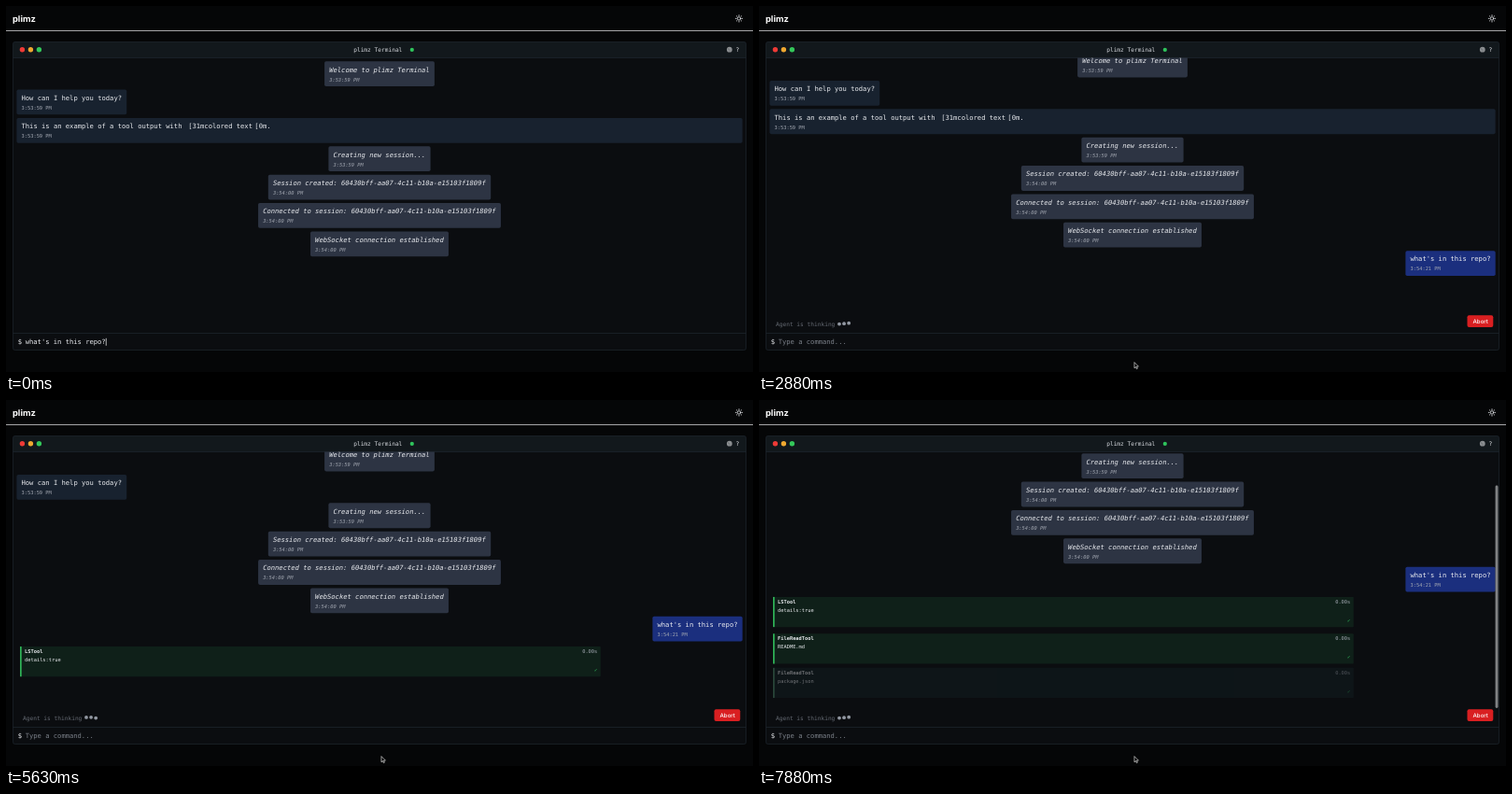
Write an HTML page that moves like this. It is 800x392 px and loops after 8 s.

```html
<!DOCTYPE html>
<html lang="en">
<head>
<meta charset="utf-8">
<title>plimz Terminal</title>
<style>
  html, body { margin: 0; width: 100%; height: 100%; overflow: hidden; background: #050607; }
  svg { display: block; width: 100%; height: 100%; }
  text {
    font: 7.15px "DejaVu Sans Mono", "Liberation Mono", monospace;
    fill: #e8eaee; white-space: pre; text-rendering: geometricPrecision;
  }
  .small { font-size: 5.36px; }
  .label { font-size: 6.2px; }
  .dim { fill: #a3a8b2; }
  .bold { font-weight: bold; }
  .system text { font-style: italic; }
  .system rect { fill: #2d3443; }
  .agent rect { fill: #18222f; }
  .user rect { fill: #1b2f7e; }
  .sans { font-family: Inter, "Liberation Sans", sans-serif; }
  .rule { stroke: #1f272e; stroke-width: .7; fill: none; }
</style>
</head>
<body>
<svg viewBox="0 0 800 392" preserveAspectRatio="none">
  <clipPath id="view"><rect x="8" y="55.5" width="784" height="275"/></clipPath>

  <text class="sans bold" x="7" y="16.8" style="font-size:9.3px;fill:#fff">plimz</text>
  <g id="sun" fill="none" stroke="#e5e7eb" stroke-width=".8" stroke-linecap="round">
    <circle cx="785" cy="13.4" r="1.7"/>
  </g>
  <rect y="26" width="800" height="1" fill="#a6a6a8"/>

  <rect x="7.5" y="38.5" width="785" height="330" rx="2" fill="#0b0d10"/>
  <path d="M7.5 55.5V40.5a2 2 0 0 1 2-2H790.5a2 2 0 0 1 2 2V55.5z" fill="#12181c"/>
  <rect class="rule" x="7.5" y="38.5" width="785" height="330" rx="2"/>
  <path class="rule" d="M7.5 55.5H792.5M7.5 350.5H792.5"/>
  <circle cx="17.4" cy="46.8" r="2.7" fill="#ee3a36"/>
  <circle cx="26.4" cy="46.8" r="2.7" fill="#f0a830"/>
  <circle cx="35.4" cy="46.8" r="2.7" fill="#34c75a"/>
  <text class="label" x="372.2" y="49" style="fill:#d5d8dd">plimz Terminal</text>
  <circle cx="434.8" cy="46.9" r="2.1" fill="#2fc45c"/>
  <circle cx="774.8" cy="46.7" r="2.9" fill="#8b8e91"/>
  <path d="M773 45.5l2.6 2.4" stroke="#63676b" stroke-width=".8"/>
  <text class="label" x="781.5" y="49">?</text>

  <g clip-path="url(#view)">
    <g id="log"><g id="early"></g><g id="late"></g></g>
  </g>
  <rect id="scrollbar" x="788.6" width="2.9" rx="1.4" fill="#818385"/>

  <g id="thinking">
    <text class="label" x="18" y="342.9" style="fill:#666b74">Agent is thinking</text>
    <g id="dots" fill="#9298a2"></g>
    <rect x="758.5" y="331.2" width="27.8" height="12.8" rx="2" fill="#d91f21"/>
    <text class="sans" x="764.5" y="339.8" style="font-size:6.13px;font-weight:500;fill:#fff">Abort</text>
  </g>

  <text x="12.8" y="362">$</text>
  <text id="input" x="20.7" y="362"></text>
  <rect id="caret" x="106.8" y="355.8" width=".7" height="8" fill="#fff"/>
  <path id="pointer" d="M402 381.6v6.2l1.4-1.3 1 2.2 1-.5-1-2.1h2z" fill="#000" stroke="#fff" stroke-width=".6"/>
</svg>
<script>
const LOOP = 8000, STEP = 125;
const SENT = 250, POINTER = 2375, FADE = 300;
const PITCH = 30.37, CARD_PITCH = 39.4, CHAR = 4.305;
const UUID = "60430bff-aa07-4c11-b10a-e15103f1809f";
const $ = id => document.getElementById(id);
const add = (parent, markup) => {
  parent.insertAdjacentHTML("beforeend", markup);
  return parent.lastElementChild;
};
const show = (node, visible) => node.style.opacity = +visible;
const moveY = (node, y) => node.setAttribute("transform", `translate(0 ${y})`);

const messages = [
  ["system", "Welcome to plimz Terminal", "3:53:59"],
  ["agent", "How can I help you today?", "3:53:59"],
  ["agent wide", 'This is an example of a tool output with <tspan dx="2.4">[31mcolored text</tspan><tspan dx="2.4">[0m.</tspan>', "3:53:59"],
  ["system", "Creating new session...", "3:53:59"],
  ["system", `Session created: ${UUID}`, "3:54:00"],
  ["system", `Connected to session: ${UUID}`, "3:54:00"],
  ["system", "WebSocket connection established", "3:54:00"],
  ["user", "what's in this repo?", "3:54:21"],
].map(([kind, body, time], i) => {
  const y = 59.2 + i * PITCH;
  const width = kind === "agent wide" ? 777.3 : body.length * CHAR + 10.2;
  const x = kind === "system" ? 400 - width / 2 : kind === "user" ? 788.7 - width : 11.4;
  return add(i < 3 ? $("early") : $("late"), `<g class="${kind}">
    <rect x="${x}" y="${y}" width="${width}" height="26.8" rx="1.8"/>
    <text x="${x + 5.1}" y="${y + 11.3}">${body}</text>
    <text class="small dim" x="${x + 5.1}" y="${y + 21.3}">${time} PM</text></g>`);
});
const toolSample = messages[2], question = messages[7];

const cards = [
  ["LSTool", "details:true", 3360],
  ["FileReadTool", "README.md", 6235],
  ["FileReadTool", "package.json", 7800],
].map(([tool, detail, start], i) => {
  const y = 304 + i * CARD_PITCH;
  const node = add($("late"), `<g>
    <rect x="15" y="${y}" width="621.8" height="32.2" rx="1"/>
    <rect x="15" y="${y}" width="1.7" height="32.2"/>
    <text class="small bold" x="20" y="${y + 7.1}">${tool}</text>
    <text class="small" x="20" y="${y + 16.1}">${detail}</text>
    <text class="small dim" x="633.3" y="${y + 7.1}" text-anchor="end">0.00s</text>
    <text class="small" x="633.3" y="${y + 27}" text-anchor="end" style="fill:#35c463">✓</text></g>`);
  return { node, start };
});

// Each scroll shows the overlay scrollbar for a short while.
const scrolls = [
  { at: 0, offset: 0 },
  { at: SENT, offset: 9.6, top: 65.5, bottom: 349.5 },
  { at: cards[1].start, offset: 23.3, top: 59.5, bottom: 330 },
  { at: cards[2].start, offset: 62.7, top: 91.5, bottom: 330 },
];

for (let i = 0; i < 8; i++)
  add($("sun"), `<path d="M785 10.6v-.9" transform="rotate(${i * 45} 785 13.4)"/>`);
const dots = [0, 1, 2].map(i => add($("dots"), `<circle cx="${86 + i * 5.1}" cy="340.6" r="1.9"/>`));

function drawCard({ node, start }, t) {
  const p = Math.min(1, Math.max(0, (t - start) / FADE));
  const eased = 1 - (1 - p) ** 2;
  const mix = (from, to) => `color-mix(in srgb, ${to} ${eased * 100}%, ${from})`;
  show(node, eased);
  moveY(node, -5.1 * (1 - eased));
  node.children[0].style.fill = mix("#14202c", "#0f2019");
  node.children[1].style.fill = mix("#6b7280", "#2fb457");
}

function draw(t) {
  const sent = t >= SENT, replaced = t >= cards[0].start;
  const scroll = scrolls.findLast(s => t >= s.at);
  moveY($("log"), -scroll.offset);
  moveY($("late"), replaced ? -PITCH : 0);
  show(toolSample, !replaced);
  show(question, sent);
  cards.forEach(card => drawCard(card, t));

  const bar = $("scrollbar");
  show(bar, scroll.top ? Math.min(1, Math.max(0, (700 - t + scroll.at) / 200)) : 0);
  bar.setAttribute("y", scroll.top || 0);
  bar.setAttribute("height", scroll.top ? scroll.bottom - scroll.top : 0);

  show($("thinking"), sent);
  dots.forEach((dot, i) => {
    const wave = Math.sin((t - SENT - i * 200) / 1000 * 2 * Math.PI);
    moveY(dot, -.9 * Math.max(0, wave));
  });
  $("input").textContent = sent ? "Type a command..." : "what's in this repo?";
  $("input").style.fill = sent ? "#7b8089" : "";
  show($("caret"), !sent);
  show($("pointer"), t >= POINTER);
}

function tick() {
  const t = performance.now() % LOOP;
  draw(Math.floor(t / STEP) * STEP);
  requestAnimationFrame(tick);
}
tick();
</script>
</body>
</html>
```
